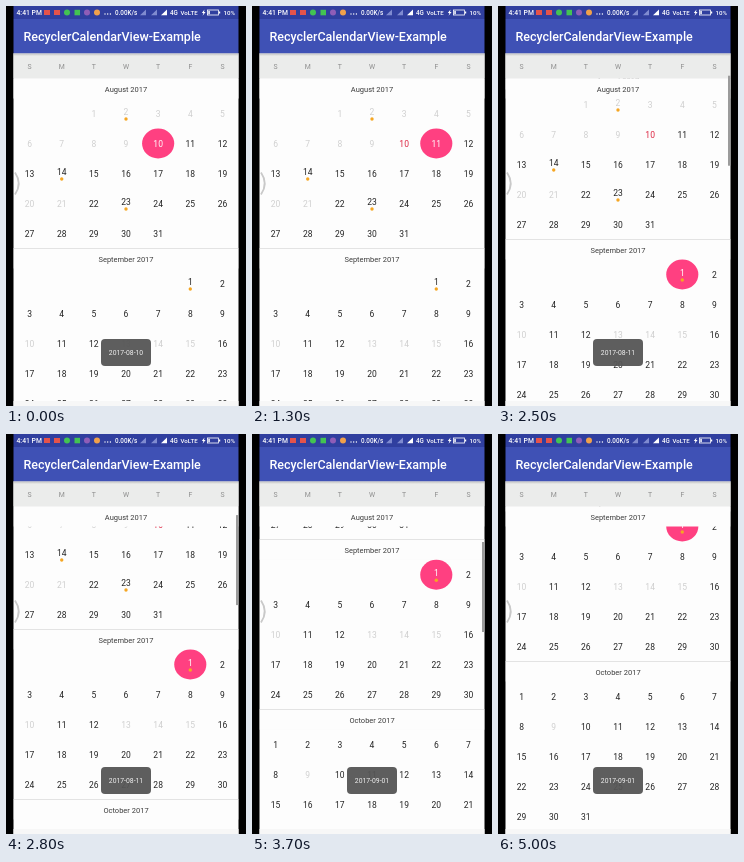
Animation, 240 px wide and 400 px high, one loop 5100 ms. Source, as an HTML page with a canvas:

```html
<!DOCTYPE html>
<html lang="en">
<head>
<meta charset="utf-8">
<title>Calendar</title>
<style>
html, body { margin: 0; height: 100%; overflow: hidden; background: #000; }
canvas { display: block; }
</style>
</head>
<body>
<canvas id="stage" width="240" height="400"></canvas>
<script>
const ctx = document.getElementById('stage').getContext('2d');

const LOOP = 5100, STEP = 100;
const LEFT = 7.5, WIDTH = 225, CELL = WIDTH / 7;
const LIST_TOP = 72.5, LIST_BOTTOM = 395, HEADER = 20, ROW = 30;

const months = [
  { name: 'August 2017', days: 31, first: 2, off: [1, 2, 3, 4, 5, 6, 7, 8, 9, 20, 21], events: [2, 14, 23], today: 10 },
  { name: 'September 2017', days: 30, first: 5, off: [10, 13, 14, 15], events: [1] },
  { name: 'October 2017', days: 31, first: 0, off: [9], events: [] }
];
const MONTH_HEIGHT = HEADER + 5 * ROW;

// Each toast: label, fade-in start and end, fade-out start and end
const toasts = [
  ['2017-08-10', -2, -1, 200, 700],
  ['2017-08-11', 1300, 1700, 2850, 3150],
  ['2017-09-01', 3050, 3400, LOOP, LOOP + 1]
];
const scrollKeys = [[2400, 0], [2500, 9], [2800, 47], [3400, 98.5], [4000, 175], [4200, 184], [4300, 185]];

const clamp = v => Math.max(0, Math.min(1, v));
const ramp = (t, a, b) => clamp((t - a) / (b - a));

function scrollAt(t) {
  let y = 0;
  for (let i = 1; i < scrollKeys.length; i++) {
    const [t0, y0] = scrollKeys[i - 1], [t1, y1] = scrollKeys[i];
    y += (y1 - y0) * ramp(t, t0, t1);
  }
  return y;
}

function selectedAt(t) {
  if (t < 1300) return [0, 10];
  return t < 2100 ? [0, 11] : [1, 1];
}

function rect(x, y, w, h, color) {
  ctx.fillStyle = color;
  ctx.fillRect(x, y, w, h);
}

function oval(x, y, rx, ry, color) {
  ctx.fillStyle = color;
  ctx.beginPath();
  ctx.ellipse(x, y, rx, ry, 0, 0, Math.PI * 2);
  ctx.fill();
}

// Draws text whose capitals are vertically centred on y
function text(str, x, y, size, color, align = 'center', weight = 400) {
  ctx.font = `${weight} ${size}px Roboto, sans-serif`;
  ctx.textAlign = align;
  ctx.fillStyle = color;
  ctx.fillText(str, x, y + size * 0.355);
}

function clipped(y0, y1, draw) {
  ctx.save();
  ctx.beginPath();
  ctx.rect(LEFT, y0, WIDTH, y1 - y0);
  ctx.clip();
  draw();
  ctx.restore();
}

function polygon(color, ...points) {
  ctx.fillStyle = color;
  ctx.beginPath();
  points.forEach(([x, y]) => ctx.lineTo(x, y));
  ctx.fill();
}

function statusBar() {
  rect(LEFT, 0, WIDTH, 13, '#303f9f');
  const label = (str, x, size) => text(str, x, 6.5, size, '#fff', 'left', 500);
  label('4:41 PM', 10.5, 6.8);
  rect(38, 4, 6, 5, '#e5534b');
  rect(48, 4, 6, 5, '#e5534b');
  oval(61, 6.5, 3, 3, '#43c353');
  rect(68.5, 3.8, 5.5, 5.5, '#43c353');
  oval(81, 6.5, 3, 3, '#8f5db7');
  oval(91, 6.5, 3, 3, '#f0a04b');
  for (const x of [99, 101.7, 104.4]) oval(x, 8, 0.7, 0.7, '#fff');
  label('0.00K/s', 109, 6.3);
  polygon('#7f8bd0', [134, 9.3], [140, 3.5], [140, 9.3]);
  polygon('#7f8bd0', [145, 9.3], [151, 3.5], [151, 9.3]);
  polygon('#fff', [155, 9.3], [161, 3.5], [161, 9.3]);
  label('4G', 164, 6.3);
  label('VoLTE', 174.5, 6.1);
  polygon('#fff', [198.5, 3.5], [195.8, 7], [197.4, 7], [196.6, 9.8], [199.6, 6], [198, 6]);
  ctx.strokeStyle = '#fff';
  ctx.lineWidth = 0.8;
  ctx.strokeRect(201.5, 4, 11, 5);
  rect(213, 5.5, 1.2, 2, '#fff');
  rect(202.3, 4.8, 1.5, 3.4, '#fff');
  label('10%', 217.5, 6.2);
}

function toolbar() {
  rect(LEFT, 13, WIDTH, 34.5, '#3f51b5');
  text('RecyclerCalendarView-Example', 17.5, 30.5, 12.5, '#fff', 'left', 500);
  rect(LEFT, 47.5, WIDTH, 25, '#ebeceb');
  const shadow = ctx.createLinearGradient(0, 47, 0, 50);
  shadow.addColorStop(0, 'rgba(0,0,0,.22)');
  shadow.addColorStop(1, 'rgba(0,0,0,0)');
  rect(LEFT, 47.5, WIDTH, 2.5, shadow);
  [...'SMTWTFS'].forEach((d, i) => text(d, LEFT + CELL * (i + 0.5), 60.3, 6.9, '#8c8c8c'));
}

function monthHeader(month, top) {
  rect(LEFT, top, WIDTH, HEADER, '#fdfdfd');
  text(month.name, 120, top + 10.5, 7.5, '#3c3c3c');
}

function monthDays(month, top, selectedDay) {
  for (let day = 1; day <= month.days; day++) {
    const cell = month.first + day - 1;
    const x = LEFT + CELL * (cell % 7 + 0.5);
    const y = top + HEADER + ROW * (Math.floor(cell / 7) + 0.5);
    const event = month.events.includes(day);
    let color = '#222';
    if (day === selectedDay) {
      oval(x, y, CELL / 2, ROW / 2, '#ff4081');
      color = '#fff';
    } else if (month.off.includes(day)) color = '#cfcfcf';
    else if (day === month.today) color = '#dc2440';
    text(day, x, event ? y - 1.7 : y, 8.5, color);
    if (event) oval(x, y + 5.5, 1.7, 1.7, '#f5a623');
  }
}

function calendar(scroll, [selMonth, selDay]) {
  const tops = months.map((_, i) => LIST_TOP + i * MONTH_HEIGHT - scroll);
  const current = Math.floor(scroll / MONTH_HEIGHT);
  clipped(LIST_TOP, LIST_BOTTOM, () => {
    months.forEach((month, i) => {
      monthHeader(month, tops[i]);
      if (i) rect(LEFT, Math.round(tops[i] - 0.5), WIDTH, 1, '#e3e3e3');
      monthDays(month, tops[i], i === selMonth ? selDay : 0);
    });
    // The pinned header is pushed up by the next month
    monthHeader(months[current], Math.min(LIST_TOP, tops[current + 1] - HEADER));
  });
}

function edgeHandle() {
  ctx.strokeStyle = '#c9c9c9';
  ctx.lineWidth = 1.8;
  ctx.beginPath();
  ctx.moveTo(9, 166.5);
  ctx.quadraticCurveTo(16.5, 177.5, 9, 188.5);
  ctx.stroke();
}

function toast(label, alpha) {
  if (!alpha) return;
  ctx.globalAlpha = alpha;
  ctx.fillStyle = 'rgba(86,86,86,.95)';
  ctx.beginPath();
  ctx.roundRect(95, 333, 50, 27, 4);
  ctx.fill();
  text(label, 120, 347, 6.8, '#f2f2f2');
  ctx.globalAlpha = 1;
}

function draw(t) {
  const scroll = scrollAt(t);
  rect(0, 0, 240, 400, '#000');
  rect(LEFT, 47, WIDTH, 353, '#fdfdfd');
  rect(LEFT, LIST_BOTTOM, WIDTH, 5, '#f7f7f7');
  calendar(scroll, selectedAt(t));
  toolbar();
  statusBar();
  edgeHandle();
  if (scroll > 0) {
    ctx.globalAlpha = 1 - ramp(t, 4800, 5000);
    rect(230, 67 + scroll * 0.3, 2.5, 90, '#9b9b9b');
    ctx.globalAlpha = 1;
  }
  for (const [label, in0, in1, out0, out1] of toasts)
    toast(label, ramp(t, in0, in1) * (1 - ramp(t, out0, out1)));
}

function frame() {
  const t = performance.now() % LOOP;
  draw(Math.floor(t / STEP) * STEP);
  requestAnimationFrame(frame);
}
frame();
</script>
</body>
</html>
```
